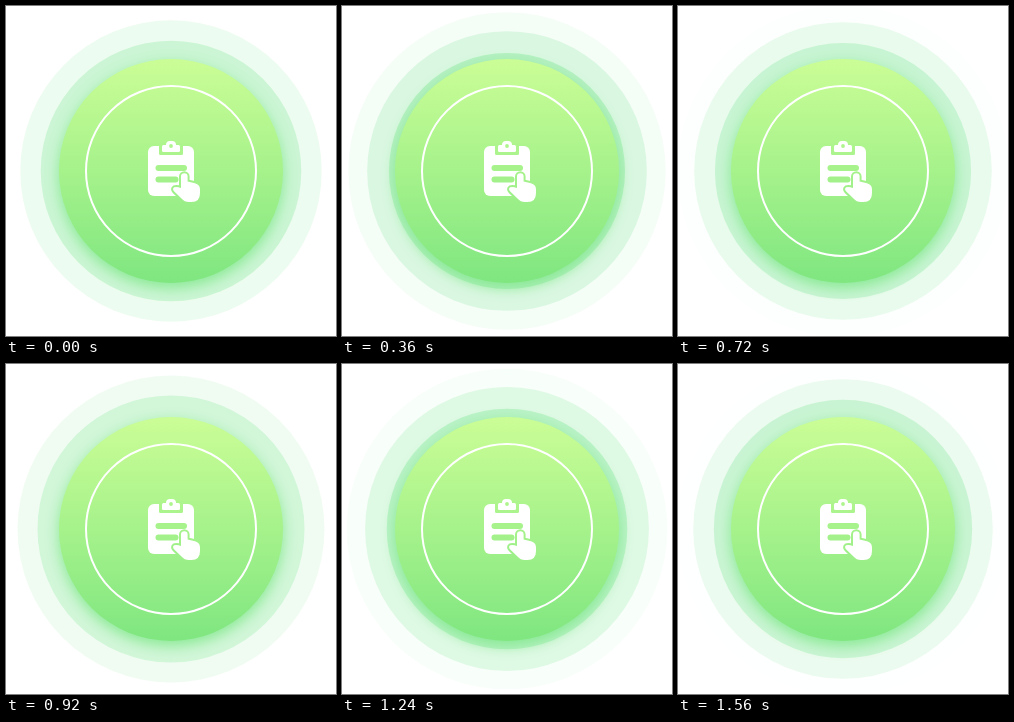
Write an HTML page with a canvas that moves like this. It is 330 px wide and 330 px high and loops after 1600 ms.

```html
<!DOCTYPE html>
<html lang="en">
<head>
<meta charset="utf-8">
<title>Pulsing button</title>
<style>
  html, body { margin: 0; width: 100%; height: 100%; overflow: hidden; background: #fff; }
  canvas { display: block; width: 330px; height: 330px; }
</style>
</head>
<body>
<canvas id="stage" width="330" height="330"></canvas>
<script>
const ctx = document.getElementById('stage').getContext('2d');
const SIZE = 330, CENTER = 165, BUTTON_RADIUS = 112;
const LOOP = 1600, STEP = 40, SPACING = 800, LIFE = 2400;

const green = ctx.createLinearGradient(0, CENTER - BUTTON_RADIUS, 0, CENTER + BUTTON_RADIUS);
green.addColorStop(0, '#cbfd96');
green.addColorStop(0.5, '#a6f28b');
green.addColorStop(1, '#7fe680');

const hand = new Path2D(
  'M175 182V170.5a3.3 3.3 0 0 1 6.6 0V175.5L189 177.2Q194 178.5 194 183.5V187' +
  'Q194 196 185.5 196H183Q178.5 196 175.5 192.5L168 185.2' +
  'Q166 182.8 168.2 181.3Q170.5 180.2 175 182Z'
);

function disc(x, y, radius, fill) {
  ctx.fillStyle = fill;
  ctx.beginPath();
  ctx.arc(x, y, radius, 0, Math.PI * 2);
  ctx.fill();
}

function box(x, y, width, height, radius, fill) {
  ctx.fillStyle = fill;
  ctx.beginPath();
  ctx.roundRect(x, y, width, height, radius);
  ctx.fill();
}

// Each ripple slows slightly as it grows and fades away.
function drawRipple(age) {
  const radius = 107.8 + 0.0285 * age - 6.6e-10 * age ** 3;
  const alpha = 0.42 * (1 - age / LIFE) ** 1.1;
  disc(CENTER, CENTER, radius, `rgba(112, 226, 137, ${alpha})`);
}

function drawButton() {
  ctx.save();
  ctx.shadowColor = 'rgba(125, 231, 135, 0.85)';
  ctx.shadowBlur = 14;
  ctx.shadowOffsetY = 5;
  disc(CENTER, CENTER, BUTTON_RADIUS, green);
  ctx.restore();

  ctx.strokeStyle = '#fff';
  ctx.lineWidth = 2;
  ctx.beginPath();
  ctx.arc(CENTER, CENTER, 85, 0, Math.PI * 2);
  ctx.stroke();
}

function drawClipboard() {
  box(142, 140, 46, 50, 6, '#fff');
  box(153, 138, 24, 11, 1.5, green);
  box(156, 139, 18, 7, 1.5, '#fff');
  box(160, 135, 10, 8, 4, '#fff');
  disc(165, 140, 1.9, green);
  box(149.5, 159, 31.5, 6, 3, green);
  box(149.5, 170.5, 23, 6, 3, green);

  ctx.strokeStyle = green;
  ctx.lineWidth = 4;
  ctx.lineJoin = 'round';
  ctx.stroke(hand);
  ctx.fillStyle = '#fff';
  ctx.fill(hand);
}

function draw(time) {
  ctx.fillStyle = '#fff';
  ctx.fillRect(0, 0, SIZE, SIZE);
  for (let age = time % SPACING; age < LIFE; age += SPACING) drawRipple(age);
  drawButton();
  drawClipboard();
}

const start = performance.now();

function tick() {
  const elapsed = (performance.now() - start) % LOOP;
  draw(Math.floor(elapsed / STEP) * STEP);
  requestAnimationFrame(tick);
}

tick();
</script>
</body>
</html>
```
